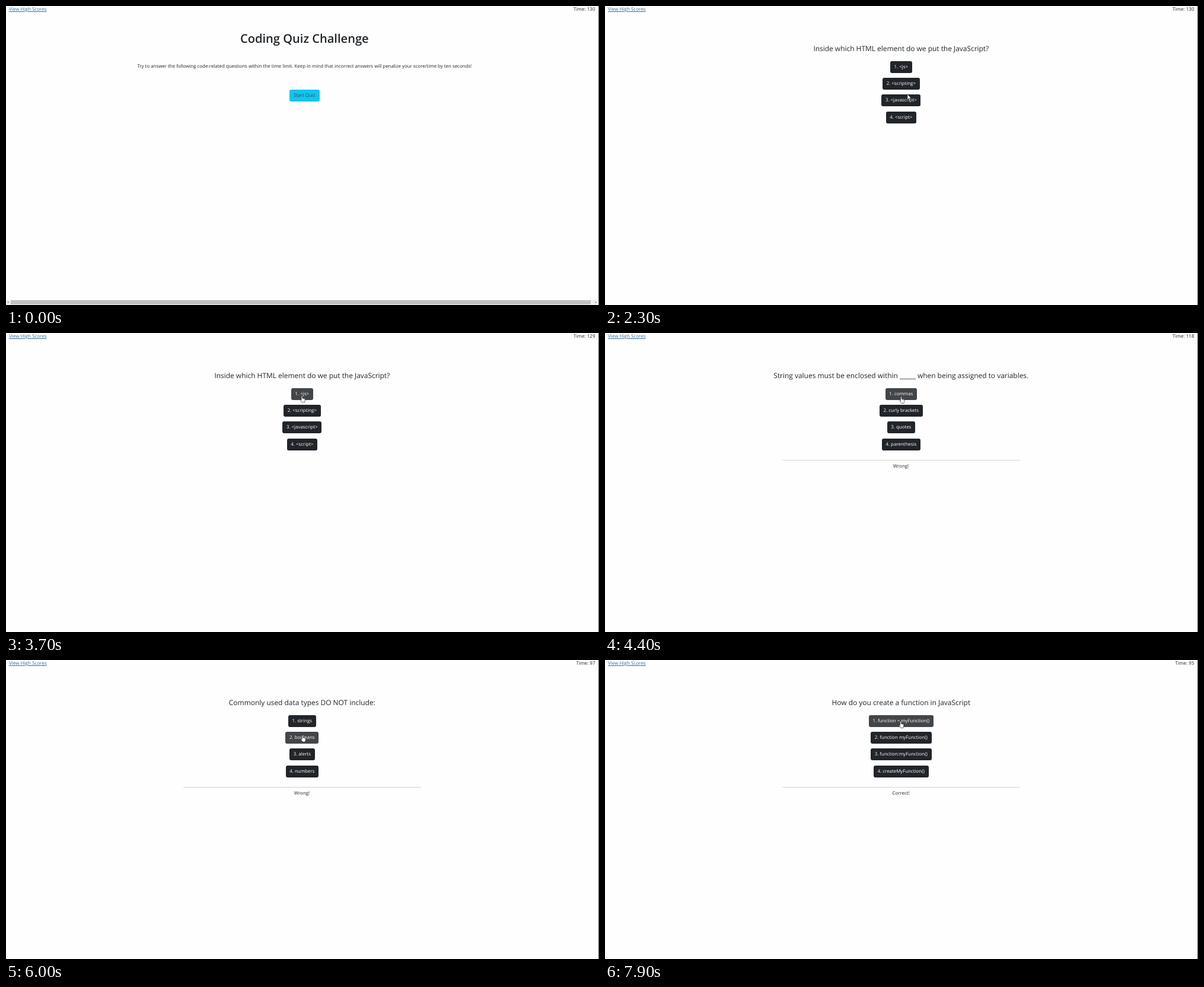
Recreate the animation shown at these times as an HTML page. Size 1000 by 504 pixels, loop 8000 ms.

```html
<!DOCTYPE html>
<html lang="en">
<head>
<meta charset="utf-8">
<title>Coding Quiz</title>
<style>
  html, body { margin: 0; width: 100%; height: 100%; overflow: hidden; background: #fefefe; }
  #stage {
    position: relative; width: 1000px; height: 504px; overflow: hidden;
    background: #fefefe; color: #212529;
    font: 7.9px/12px "Open Sans", "Noto Sans", sans-serif;
    text-rendering: geometricPrecision; white-space: nowrap;
  }
  #stage > *, .page > * { position: absolute; }
  [hidden] { display: none !important; }
  .page { left: 0; top: 0; width: 998.6px; height: 504px; text-align: center; }
  .page > * { left: 0; width: 100%; margin: 0; }

  #scores { left: 5px; top: 0; font-size: 8.05px; color: #2b76a6; text-decoration: underline; text-underline-offset: 1px; text-decoration-thickness: .6px; }
  #time { right: 6.5px; top: 0; font-size: 8.05px; }
  #edge { left: 999px; top: 0; width: 1px; height: 504px; background: #555; }

  #intro { width: 1006.6px; }
  h1 { top: 41px; font-size: 20.1px; line-height: 28px; font-weight: 600; }
  #rules { top: 95.6px; }
  .btn { display: inline-block; box-sizing: border-box; height: 20px; padding: 0 6.7px; border-radius: 3px; line-height: 20.6px; }
  #startRow { top: 141px; height: 20px; line-height: 0; }
  #start { padding: 0 7.2px; color: #4a4446; }

  #question { top: 62px; font-size: 11.95px; line-height: 20px; }
  #answers { top: 93.1px; display: flex; flex-direction: column; align-items: center; gap: 8.15px; }
  #answers .btn { color: #fff; }
  #result { top: 214px; left: 299px; width: 401px; height: 1px; background: #d3d3d3; }
  #result span { position: absolute; left: 0; width: 400px; top: 4.7px; }

  #scrollbar { left: 0; top: 495px; width: 999px; height: 9px; background: #f1f1f1; }
  #scrollbar i { position: absolute; left: 8px; top: 1px; width: 978px; height: 7px; background: #c1c1c1; }
  #scrollbar svg { position: absolute; left: 0; top: 0; }
  #cursor { left: 0; top: 0; width: 10px; height: 13px; overflow: visible; }
  #cursor path { fill: #fff; stroke: #333; stroke-width: .7; stroke-linejoin: round; }
</style>
</head>
<body>
<div id="stage">
  <span id="scores">View High Scores</span>
  <span id="time"></span>

  <div id="intro" class="page">
    <h1>Coding Quiz Challenge</h1>
    <p id="rules">Try to answer the following code-related questions within the time limit. Keep in mind that incorrect answers will penalize your score/time by ten seconds!</p>
    <div id="startRow"><span id="start" class="btn">Start Quiz</span></div>
  </div>

  <div id="quiz" class="page" hidden>
    <p id="question"></p>
    <div id="answers"></div>
    <div id="result"><span></span></div>
  </div>

  <div id="scrollbar">
    <i></i>
    <svg width="999" height="9"><path d="M4.2 3.1v3L2.4 4.6zM993.9 3.1v3l1.8-1.5z" fill="#505050"/></svg>
  </div>
  <div id="edge"></div>

  <svg id="cursor">
    <path id="hand" d="M-.9 .6a.9 .9 0 0 1 1.8 0V4L4 4.5Q5.2 4.8 5.2 6V8L4.4 11H.4L-2.4 7.4Q-2.9 6.4-2 6.2L-.9 7z"/>
    <path id="arrow" d="M0 0V9L2 7.1 3.4 10.2 4.7 9.6 3.4 6.6H6.2z"/>
  </svg>
</div>

<script>
const LOOP = 8000, STEP = 100, QUIZ_START = 2300;

// Each screen: start time, feedback on the previous answer, question, answers
const screens = [
  [QUIZ_START, "", "Inside which HTML element do we put the JavaScript?",
    ["<js>", "<scripting>", "<javascript>", "<script>"]],
  [4000, "Wrong!", "String values must be enclosed within _____ when being assigned to variables.",
    ["commas", "curly brackets", "quotes", "parenthesis"]],
  [5000, "Wrong!", "Arrays in JavaScript can be used to store _____.",
    ["numbers and strings", "other arrays", "booleans", "all of the above"]],
  [5600, "Wrong!", "Commonly used data types DO NOT include:",
    ["strings", "booleans", "alerts", "numbers"]],
  [7200, "Correct!", "How do you create a function in JavaScript",
    ["function = myFunction()", "function myFunction()", "function:myFunction()", "createMyFunction()"]],
];

// Pointer path: time, x, y
const path = [
  [200, 676, 151], [400, 596, 153], [600, 520, 152], [800, 520, 152], [1300, 510.5, 149],
  [1700, 510, 148.8], [2800, 510, 148.8], [2900, 507, 152], [3000, 504, 135.5],
  [3400, 500, 111], [3700, 499, 106], [4000, 499, 106], [4400, 499.5, 107.5],
  [4600, 499, 106], [5000, 499, 106], [5400, 500, 130], [5600, 500, 130],
  [6000, 500, 127], [6400, 500, 131], [6700, 500, 131], [6800, 501, 163],
  [7200, 505, 163.5], [7600, 500, 108], [7900, 498.5, 103.5],
];

const $ = id => document.getElementById(id);
const buttons = [0, 1, 2, 3].map(() => {
  const button = document.createElement("span");
  button.className = "btn";
  $("answers").append(button);
  return button;
});

function pointer(t) {
  if (t < path[0][0]) return null;
  const next = path.findIndex(p => p[0] > t);
  if (next < 0) return path.at(-1).slice(1);
  const [t0, x0, y0] = path[next - 1], [t1, x1, y1] = path[next];
  const k = (t - t0) / (t1 - t0);
  return [x0 + (x1 - x0) * k, y0 + (y1 - y0) * k];
}

const onStart = t => {
  const p = pointer(t);
  return !!p && t < QUIZ_START && Math.abs(p[0] - 503.3) < 25 && Math.abs(p[1] - 151) < 10;
};

const onAnswer = (t, i) => {
  const p = pointer(t);
  return !!p && t >= QUIZ_START && Math.abs(p[1] - 103.1 - 28.15 * i) < 10;
};

// Hover colour follows the pointer with a short fade
const fade = over => .4 * over(-STEP) + .6 * over(-2 * STEP);
const mix = (from, to, k) => `rgb(${from.map((c, i) => Math.round(c + (to[i] - c) * k))})`;

function drawQuiz(t, current) {
  const [start, feedback, question, answers] = current;
  $("question").textContent = question;
  $("result").hidden = !feedback;
  $("result").firstChild.textContent = feedback;
  buttons.forEach((button, i) => {
    const pressed = t - start < STEP && start > QUIZ_START;
    button.textContent = `${i + 1}. ${answers[i]}`;
    button.style.background = mix([33, 37, 41], pressed ? [77, 81, 84] : [66, 70, 73],
      fade(dt => onAnswer(t + dt, i)));
  });
}

function draw(t) {
  const seen = screens.filter(s => s[0] <= t);
  const inQuiz = seen.length > 0;
  const wrong = seen.filter(s => s[1] === "Wrong!").length;
  const ticks = Math.max(0, Math.floor((t - QUIZ_START) / 1000));

  $("time").textContent = `Time: ${130 - ticks - 10 * wrong}`;
  $("scores").style.color = inQuiz ? "#386c9a" : "";
  $("intro").hidden = $("scrollbar").hidden = inQuiz;
  $("quiz").hidden = !inQuiz;
  if (inQuiz) drawQuiz(t, seen.at(-1));
  else $("start").style.background = mix([16, 198, 238], [49, 210, 242], fade(dt => onStart(t + dt)));

  const p = pointer(t);
  $("cursor").style.display = p ? "" : "none";
  if (!p) return;
  const overButton = onStart(t) || buttons.some((_, i) => onAnswer(t, i));
  $("cursor").style.transform = `translate(${p[0]}px, ${p[1]}px)`;
  $("hand").style.display = overButton ? "" : "none";
  $("arrow").style.display = overButton ? "none" : "";
}

const begin = performance.now();
function frame() {
  const t = (performance.now() - begin) % LOOP;
  draw(Math.floor(t / STEP) * STEP);
  requestAnimationFrame(frame);
}
frame();
</script>
</body>
</html>
```
